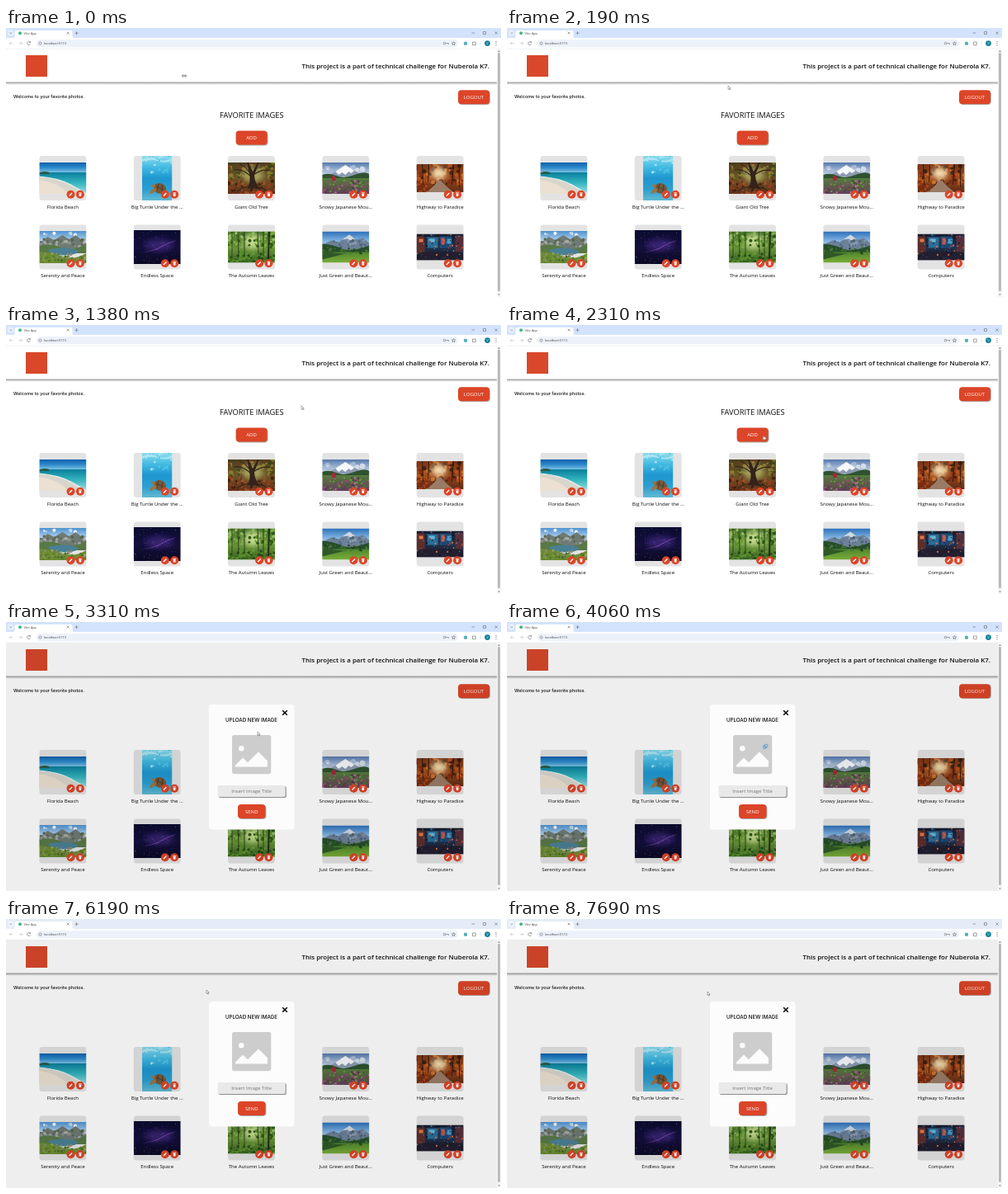
These frames come from a looping animation (600x326 px, 8000 ms). An HTML page:

```html
<!DOCTYPE html>
<html lang="en">
<head>
<meta charset="utf-8">
<title>Favorite images</title>
<style>
html, body { margin: 0; width: 100%; height: 100%; overflow: hidden; background: #fff; }
svg { display: block; }
#stage { width: 100vw; height: 100vh; }
text { font-family: "Open Sans", "Noto Sans", sans-serif; font-weight: 500; fill: #0c0c0c; }
.mid { text-anchor: middle; }
.inter { font-family: Inter, sans-serif; }
.chrome { font: 4.1px Roboto, sans-serif; fill: #555; }
.btn { font-size: 6px; fill: #fff; text-anchor: middle; }
.ico { fill: none; stroke: #666; stroke-width: .6; }
#bar { animation: bar 8s step-end infinite; }
#page { animation: blur 8s step-end infinite; }
#modal { animation: modal 8s step-end infinite; }
#cursor { animation: move 8s linear infinite; }
#resize { animation: resize 8s step-end infinite; }
#arrow { animation: arrow 8s step-end infinite; }
#hand { animation: hand 8s step-end infinite; }
#link { animation: link 8s step-end infinite; }
@keyframes bar { 0% { fill: #d3e3fd } 60.1%, 100% { fill: #e4ecf8 } }
@keyframes blur { 0% { filter: none } 40.6%, 100% { filter: blur(.75px) } }
@keyframes modal { 0% { opacity: 0 } 40.6%, 100% { opacity: 1 } }
@keyframes resize { 0% { opacity: 1 } .75%, 100% { opacity: 0 } }
@keyframes arrow {
  0% { opacity: 0 } .75% { opacity: 1 } 28.1% { opacity: 0 }
  40.6% { opacity: 1 } 50.7% { opacity: 0 } 64%, 100% { opacity: 1 }
}
@keyframes hand { 0% { opacity: 0 } 28.1% { opacity: 1 } 40.6%, 100% { opacity: 0 } }
@keyframes link { 0% { opacity: 0 } 50.7% { opacity: 1 } 64%, 100% { opacity: 0 } }
@keyframes move {
  0%, .7% { transform: translate(216px, 58px) }
  5.4%, 7.9% { transform: translate(361px, 91px) }
  17.5% { transform: translate(358px, 98px) }
  27.4% { transform: translate(331px, 128px) }
  28.8% { transform: translate(310.5px, 133.5px) }
  32% { transform: translate(306.5px, 133px) }
  40.6%, 41.5% { transform: translate(305px, 133px) }
  50% { transform: translate(299px, 147px) }
  57.9%, 60% { transform: translate(416px, 159px) }
  61% { transform: translate(344.5px, 146px) }
  69.5% { transform: translate(262px, 100px) }
  77%, 81.2% { transform: translate(243px, 86px) }
  81.9%, 100% { transform: translate(243px, 88px) }
}
</style>
</head>
<body>
<svg id="stage" viewBox="0 0 600 326" preserveAspectRatio="none">
  <defs>
    <linearGradient id="drop" x2="0" y2="1">
      <stop stop-color="#8c8c8c"/><stop offset=".35" stop-color="#b4b4b4" stop-opacity=".8"/><stop offset="1" stop-color="#fff" stop-opacity="0"/>
    </linearGradient>
    <clipPath id="view"><rect y="25" width="595" height="301"/></clipPath>
    <filter id="soft"><feGaussianBlur stdDeviation=".6"/></filter>
    <filter id="glow" x="-50%" y="-50%" width="200%" height="200%"><feGaussianBlur stdDeviation="3"/></filter>
  </defs>

  <g clip-path="url(#view)">
    <rect y="25" width="595" height="301" fill="#fff"/>
    <g id="page">
      <rect x="-5" y="20" width="605" height="311" fill="#fff"/>
      <rect y="65.6" width="595" height="4" fill="url(#drop)"/>
      <rect x="24" y="33" width="26" height="26" fill="#d9482b"/>
      <text x="586" y="48.6" font-size="7.95" style="font-weight:600" text-anchor="end">This project is a part of technical challenge for Nuberola K7.</text>
      <text class="inter" x="9" y="85" font-size="5.45">Welcome to your favorite photos.</text>
      <text class="mid" x="297.7" y="109" font-size="9.3">FAVORITE IMAGES</text>
      <g id="buttons"></g>
      <g id="cards"></g>
    </g>
    <g id="modal">
      <rect y="25" width="595" height="301" fill="#000" opacity=".065"/>
      <rect x="246" y="100" width="103.5" height="151.5" rx="3.5" fill="#fcfcfc"/>
      <path d="M335.2 107.2l5.6 5.6m0-5.6l-5.6 5.6" stroke="#000" stroke-width="1.5"/>
      <text class="inter mid" x="297.4" y="121.4" font-size="6.2">UPLOAD NEW IMAGE</text>
      <rect x="274" y="137" width="47.3" height="47.3" rx="3" fill="#cdcdcd"/>
      <circle cx="285.3" cy="153.3" r="3.3" fill="#fcfcfc"/>
      <path d="M278 175.5v-2l9-9 6 5.8 13-13 11 11v7.2z" fill="#fcfcfc"/>
      <rect x="257.6" y="199" width="82.2" height="14" rx="2" fill="#8c8c8c"/>
      <rect x="256.5" y="198" width="82.2" height="14" rx="2" fill="#e9e9e9"/>
      <text class="mid" x="297.6" y="207.2" font-size="6.05" style="fill:#757575">Insert Image Title</text>
      <g id="send"></g>
    </g>
  </g>

  <g id="browser">
    <rect id="bar" width="600" height="14" fill="#d3e3fd"/>
    <rect y="12" width="600" height="13.2" fill="#fff"/>
    <path d="M8 12.5q2.5 0 2.5-3v-4q0-2.5 2.5-2.5h65q2.5 0 2.5 2.5v4q0 3 2.5 3z" fill="#fff"/>
    <circle cx="17" cy="6.3" r="2" fill="#41b883"/>
    <text class="chrome" x="21.5" y="7.8">Vite App</text>
    <rect x="2" y="2.5" width="7" height="7" rx="2" fill="#fff" opacity=".45"/>
    <path class="ico" d="M4.3 5.5l1.4 1.4 1.4-1.4M73.7 4.7l2.8 2.8m0-2.8l-2.8 2.8M85.5 4.2v4m-2-2h4M564.5 6h3.5M578.5 4.5h3v3h-3zM592.5 4.5l3.2 3.2m0-3.2l-3.2 3.2"/>
    <rect x="37" y="14" width="511" height="9.3" rx="4.6" fill="#edf2fa"/>
    <path class="ico" style="stroke:#bbb" d="M8.5 18.6h-4.2m1.9-1.9l-1.9 1.9 1.9 1.9M15.5 18.6h4.2m-1.900-1.9l1.9 1.9-1.9 1.9"/>
    <path class="ico" d="M29.200 17.300a2 2 0 1 0 .3 2M29.600 15.800v1.800h-1.800"/>
    <circle class="ico" cx="41.5" cy="18.6" r="1.6"/>
    <text class="chrome" x="46" y="20.1">localhost:5173</text>
    <path class="ico" d="M533 18.6h3.5v1.3M530.2 18.6a1.3 1.3 0 1 0 2.6 0a1.3 1.3 0 1 0-2.6 0M542.5 16.5l.6 1.5 1.6.1-1.2 1 .4 1.6-1.4-.9-1.4.9.4-1.6-1.2-1 1.6-.1z"/>
    <circle cx="557" cy="18.7" r="2.2" fill="#54aebb"/>
    <path class="ico" d="M565.5 17h3.8v3.7h-3.8z"/>
    <path d="M575 16v5" stroke="#c5d5ee" stroke-width=".6"/>
    <circle cx="583.5" cy="18.6" r="3.4" fill="#148299"/>
    <text class="mid" x="583.5" y="20" font-size="3.6" style="fill:#fff">V</text>
    <path d="M594 16.4v.01M594 18.6v.01M594 20.8v.01" stroke="#444" stroke-width="1" stroke-linecap="round"/>
    <path d="M0 25.2h600" stroke="#dfe4ea" stroke-width=".5"/>
    <rect x="595" y="25.5" width="5" height="300.5" fill="#f5f5f5"/>
    <rect x="596.2" y="30" width="2.6" height="289" rx="1.3" fill="#b4b4b4"/>
    <path d="M596.2 28.7l1.3-1.6 1.3 1.6zM596.2 322.5l1.3 1.6 1.3-1.6z" fill="#777"/>
  </g>

  <g id="cursor">
    <path id="resize" d="M-3 0l1.6-1.5v1h2.8v-1l1.6 1.5-1.6 1.5v-1h-2.8v1z" fill="#fff" stroke="#333" stroke-width=".45"/>
    <path id="arrow" d="M0 0v4.4l1-.9.8 1.6.8-.4-.8-1.5h1.4z" fill="#fff" stroke="#333" stroke-width=".4"/>
    <path id="hand" d="M0 .6q.5-.8 1 0v1.5l2.1.4q.8.2.6 1l-.4 2h-2.6l-1.6-2q0-.9.9-.3z" fill="#fff" stroke="#222" stroke-width=".4"/>
    <g id="link" fill="#e8f4fc" stroke="#2b78b5" stroke-width=".8">
      <rect x=".4" y="1.8" width="3.3" height="3.2" rx=".6"/>
      <rect x="2.2" y=".3" width="3.2" height="3" rx=".6"/>
      <path d="M1.5 4l2.5-2.3"/>
    </g>
  </g>
</svg>

<script>
const $ = id => document.getElementById(id);
const rect = (x, y, w, h, fill, more = '') =>
  `<rect x="${x}" y="${y}" width="${w}" height="${h}" fill="${fill}" ${more}/>`;
const path = (d, fill, more = '') => `<path d="${d}" fill="${fill}" ${more}/>`;
const line = (d, color, width) => path(d, 'none', `stroke="${color}" stroke-width="${width}"`);
const glow = (x, y, rx, ry, color) =>
  `<ellipse cx="${x}" cy="${y}" rx="${rx}" ry="${ry}" fill="${color}" filter="url(#glow)"/>`;

const button = (x, y, w, label) =>
  rect(x + .9, y + .9, w, 17, '#8d8d8d', 'rx="4" opacity=".75"') +
  rect(x, y, w, 17, '#dc4528', 'rx="4"') +
  `<text class="btn" x="${x + w / 2}" y="${y + 10.7}">${label}</text>`;

let gradients = 0;
// Vertical gradient filling a box
function fade(x, y, w, h, ...colors) {
  const id = 'g' + gradients++;
  const stops = colors.map((c, i) => `<stop offset="${i / (colors.length - 1)}" stop-color="${c}"/>`);
  return `<linearGradient id="${id}" x2="0" y2="1">${stops.join('')}</linearGradient>` +
    rect(x, y, w, h, `url(#${id})`);
}

// Seeded speckles
function dots(seed, n, x, y, w, h, r, ...colors) {
  const rnd = () => (seed = (seed * 16807) % 2147483647) / 2147483647;
  let out = '';
  for (let i = 0; i < n; i++) {
    const cx = x + rnd() * w, cy = y + rnd() * h, size = r * (.5 + rnd());
    out += `<circle cx="${cx.toFixed(1)}" cy="${cy.toFixed(1)}" r="${size.toFixed(2)}" fill="${colors[i % colors.length]}"/>`;
  }
  return out;
}

// Each picture is drawn in its own box: name, width, height, art
const pictures = [
  ['Florida Beach', 57, 38,
    fade(0, 0, 57, 13, '#0b5fae', '#2f8ccc', '#8cc9e6') +
    fade(0, 12, 57, 26, '#0a7f9c', '#35b5c0', '#a9dedd') + path('M0 12.5q6-2.500 12-.5v2h-12z', '#285a44') +
    path('M0 17q24 2 38 10t19 11h-57z', '#d9d5cb') + path('M0 21q22 3 36 17h-36z', '#ebe0d1') +
    line('M0 17q24 2 38 10t19 11', '#e9f6f5', 1.2)],
  ['Big Turtle Under the …', 36.5, 54,
    fade(0, 0, 36.5, 54, '#8fdcee', '#43bbe2', '#1e97d0', '#2b9fd1', '#63b9d2') +
    path('M0 4q9-4 18 0t18.5-1v3q-9 3-18 0t-18.5 1z', '#c2eef7', 'opacity=".7"') +
    dots(12, 30, 0, 0, 36.5, 20, 1.1, '#a9e4f2', '#52c2e4') +
    path('M14 37q4-6 11-3 6 4 3 10-7 4-13-1z', '#75593c') +
    path('M16 39q-6 1-7 7 5 0 9-5zM26 43l3 6q3-3 1-7zM16 36q-4-3-5-1 1 4 4 4z', '#9a744a') +
    line('M17 37l9 4m-6-7l-2 8m7-7l-1 8', '#4b3625', .8)],
  ['Giant Old Tree', 57, 38,
    fade(0, 0, 57, 38, '#4a3e1d', '#6d5526', '#632f18') +
    dots(7, 70, 0, 0, 57, 20, 1.7, '#7c7b2b', '#39451c', '#8f7a34', '#6a3a20') +
    dots(8, 55, 0, 22, 57, 16, 1.6, '#8d3f1f', '#42200f', '#9c4f2a') + glow(30, 15, 13, 9, '#a6a05c') +
    path('M23 32q5-8 3-18l-3-14h2l5 11 6-11h2l-6 15q0 10 8 18l-9-2-2 3-2-3z', '#33231a') +
    line('M27 16q-10-9-20-7M31 15q11-8 20-5M25 29q-8 1-14 6M35 29q9 2 14 7M26 12q-5-8-12-10', '#33231a', 1.2)],
  ['Snowy Japanese Mou…', 57, 38,
    fade(0, 0, 57, 18, '#5679ae', '#9db4d2', '#d5dfea') + dots(14, 16, 0, 3, 57, 9, 2.4, '#d3dce8', '#a8bbd5') +
    path('M5 17l16-9 7-5 8 5 16 9z', '#8c9ab2') + path('M16 11l12-8 11 7-4 3-3-2-4 4-4-3-4 3z', '#f5f7fa') +
    path('M0 15q8-3 17 1t22-1 18-1v8h-57z', '#2f5230') + fade(0, 19, 57, 19, '#527f3c', '#5d5c48', '#63405a') +
    dots(21, 85, 0, 22, 57, 16, 1, '#a1447f', '#4b7536', '#b9689f', '#4f3a45', '#6f9747') +
    path('M12 22q-2-6 2-6t2 6z', '#a3293a')],
  ['Highway to Paradice', 57, 34,
    fade(0, 0, 57, 34, '#7a3516', '#9a4a1e', '#5c2a14') +
    dots(55, 75, 0, 0, 57, 24, 1.9, '#832d13', '#b4521c', '#42220f', '#c9702c') +
    glow(27, 11, 9, 7, '#f3dfb0') + path('M25 20h5q4 6 15 14h-35q12-6 15-14z', '#9a7c66') +
    dots(56, 25, 0, 24, 14, 10, 1.6, '#7a2d12', '#a9481b') +
    line('M7 0l1 25M15 0l-1 22M45 0l-2 25M52 0v28', '#2d1a10', 1)],
  ['Serenity and Peace', 57, 39,
    fade(0, 0, 57, 13, '#4e92d0', '#bcd8ee') + dots(19, 7, 6, 2, 42, 3, 1.5, '#edf4fa', '#b9d3e8') +
    path('M0 15l10-8 8 4 10-6 8 5 8-5 13 10v10h-57z', '#6f7a74') +
    dots(29, 40, 0, 10, 57, 10, 1.4, '#8d948c', '#57654f', '#a8aca4') +
    path('M0 18q14-4 27 2t30-5v12h-57z', '#587846') + path('M10 23q18-5 35 0 6 4-9 6-20 2-26-6z', '#4a8095') +
    path('M0 25q17 1 29 6t28-4v12h-57z', '#6b8b32') +
    dots(23, 55, 0, 27, 57, 12, 1.2, '#9da849', '#486b28', '#878b76', '#5c7e2f')],
  ['Endless Space', 57, 41,
    fade(0, 0, 57, 41, '#0a0c30', '#150f3c', '#0a0a24') + glow(31, 18, 17, 7, '#35206e') +
    path('M10 27q16-3 24-8t19-7q-14 5-20 9t-23 6z', '#7d4bb0', 'opacity=".7" filter="url(#soft)"') +
    dots(91, 60, 0, 0, 57, 41, .3, '#bba9ee', '#5f74c0', '#9a67c4')],
  ['The Autumn Leaves', 57, 38,
    fade(0, 0, 57, 38, '#3f6f22', '#6f9a3c', '#33611e') + glow(30, 12, 11, 9, '#c3d88e') +
    dots(41, 85, 0, 0, 57, 20, 1.5, '#56902a', '#7dab45', '#2d5717', '#93b968') +
    dots(42, 65, 0, 25, 57, 13, 1.5, '#568c2b', '#274a16', '#6b9639') +
    line('M5 0v32M12 0l1 29M20 0v28M36 0l1 28M43 0v30', '#344020', 1) + line('M50 0l-1 34', '#262c18', 2)],
  ['Just Green and Beaut…', 57, 38,
    fade(0, 0, 57, 20, '#2c6fba', '#76abdc', '#cfe1ef') + path('M0 16l11-5 9 2 13-9 9 6 7-2 8 6v9h-57z', '#6d8199') +
    path('M24 10l9-6 8 6-4-1-3 3-3-3z', '#cdd9e4') + dots(62, 25, 14, 11, 40, 8, 1.3, '#596d86', '#8a9bb0', '#49606c') +
    path('M0 15q14 1 24 6t33-4v10h-57z', '#274e2c') + fade(0, 25, 57, 13, '#52862d', '#79ad39') +
    path('M0 21l14 5 14 1-28 7z', '#2f5826') + dots(67, 35, 0, 19, 57, 8, 1.2, '#244820', '#396a2b', '#4c7a35')],
  ['Computers', 57, 32,
    fade(0, 0, 57, 32, '#151a2c', '#22314d', '#14141f') +
    rect(0, 3, 10, 20, '#5c2e2b') + rect(3, 6, 5, 4, '#dd794b') + rect(47, 2, 10, 20, '#55303a') +
    rect(13, 4, 13, 13, '#2a6d98') + rect(28, 3, 15, 14, '#1c4a76') + rect(15, 6, 7, 4, '#67b6d6') +
    rect(30, 5, 4, 8, '#c55a50') + rect(37, 6, 5, 6, '#4f9bc4') + path('M7 22h44l5 10h-56z', '#231f30') +
    dots(77, 75, 0, 1, 57, 29, .8, '#c9744d', '#2f83b4', '#151420', '#a8433c', '#1d3454')]
];

const icon = (x, y, glyph) =>
  `<g transform="translate(${x} ${y})"><circle r="5" fill="#dc4528"/>${glyph}</g>`;
const pencil = line('M-1.9 1.9l3.5-3.5', '#fff', 1.35);
const trash = path('M-1.5-1h3l-.3 3.2h-2.4zM-1.9-2.1h1.2l.3-.4h.8l.3.4h1.2v.7h-3.8z', '#fff');

$('cards').innerHTML = pictures.map(([name, w, h, art], i) => {
  const x = 40.5 + 114.3 * (i % 5), y = 155 + (i > 4 ? 83.5 : 0);
  return rect(x, y, 56.8, 54, '#e3e3e3', 'rx="3"') +
    `<svg x="${x + 28.4 - w / 2}" y="${y + 27 - h / 2}" width="${w}" height="${h}" overflow="hidden"><g filter="url(#soft)">${art}</g></svg>` +
    icon(x + 38, y + 46.7, pencil) + icon(x + 49.4, y + 46.7, trash) +
    `<text class="mid" x="${x + 28.4}" y="${y + 63.7}" font-size="6.05">${name}</text>`;
}).join('');
$('buttons').innerHTML = button(548, 75.2, 38, 'LOGOUT') + button(278.6, 124.5, 38, 'ADD');
$('send').innerHTML = button(281, 221, 33.5, 'SEND');
</script>
</body>
</html>
```
